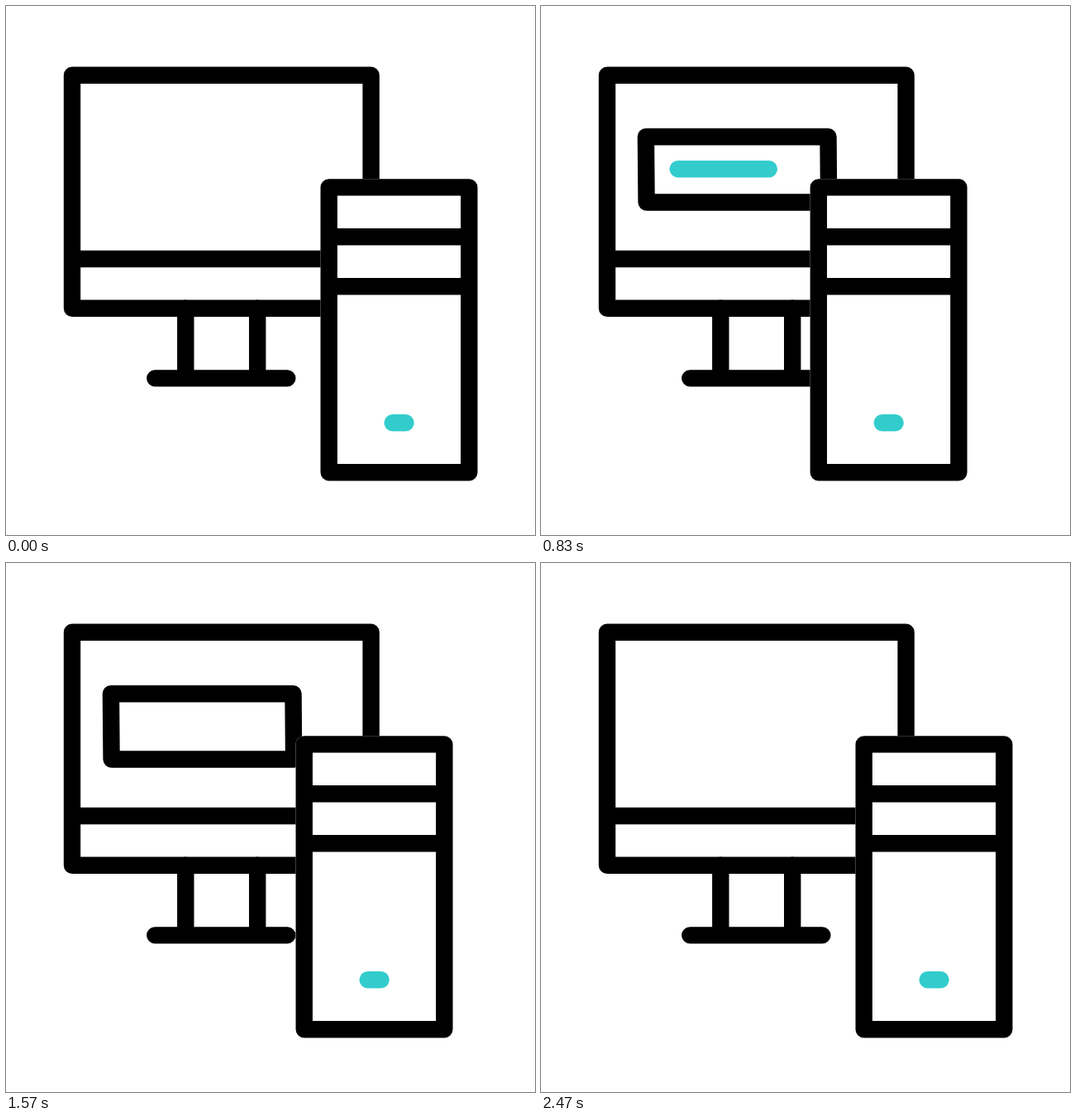
Recreate the animation shown at these times as an HTML page. Size 640 by 640 pixels, loop 2500 ms.

```html
<!DOCTYPE html>
<html lang="en">
<head>
<meta charset="utf-8">
<title>Desktop computer</title>
<style>
  html, body { margin: 0; width: 100%; height: 100%; overflow: hidden; background: #fff; }
  svg { display: block; width: 100vw; height: 100vh; }
  .ink { fill: none; stroke: #000; stroke-width: 20.4; stroke-linecap: round; stroke-linejoin: round; }
  .teal { stroke: #33cccc; }
</style>
</head>
<body>
<svg viewBox="0 0 640 640">
  <g class="ink">
    <path d="M80 83.8H441.6V365.8H80ZM80 306H441.6"/>
    <path d="M217.3 365.8V450.4M304.2 365.8V450.4M180.3 450.4H340.3"/>
    <path id="panel"/>
    <path id="bar" class="teal"/>
  </g>
  <g id="tower">
    <rect x="380.5" y="209.2" width="190" height="365.2" rx="10.2" fill="#fff"/>
    <g class="ink">
      <path d="M390.7 219.4H560.3V564.2H390.7ZM390.7 279.2H560.3M390.7 339.2H560.3"/>
      <path id="led" d="M467.7 504.2H483.5"/>
    </g>
  </g>
</svg>
<script>
  const LOOP = 2500, STEPS = 75, TEAL = '#33cccc';
  const $ = id => document.getElementById(id);
  const panel = $('panel'), bar = $('bar'), tower = $('tower'), led = $('led');

  const corners = [[348.1, 237.5], [127.6, 237.5], [126.9, 158.2], [347.5, 158.2], [348.1, 237.5]];
  const line = [[165.7, 197.2], [303.8, 197.2]];

  const clamp = v => Math.max(0, Math.min(1, v));
  const smooth = (t, a, b) => {
    const u = clamp((t - a) / (b - a));
    return u * u * (3 - 2 * u);
  };

  // Cubic easing with flat ends; x1 and x2 set the pull at each side.
  function ease(t, a, b, x1, x2) {
    const x = clamp((t - a) / (b - a));
    let lo = 0, hi = 1;
    for (let i = 0; i < 24; i++) {
      const m = (lo + hi) / 2, n = 1 - m;
      if (3 * n * n * m * x1 + 3 * n * m * m * x2 + m * m * m < x) lo = m; else hi = m;
    }
    if (x === 0 || x === 1) return x;
    return lo * lo * (3 - 2 * lo);
  }

  // Path data for the part of a polyline between fractions a and b.
  function trim(pts, a, b) {
    if (b <= a) return '';
    const lens = pts.slice(1).map((p, i) => Math.hypot(p[0] - pts[i][0], p[1] - pts[i][1]));
    const total = lens.reduce((s, n) => s + n, 0);
    const from = a * total, to = b * total;
    const out = [];
    let pos = 0;
    lens.forEach((len, i) => {
      const s = Math.max(from, pos), e = Math.min(to, pos + len);
      const at = d => pts[i].map((v, k) => (v + (pts[i + 1][k] - v) * (d - pos) / len).toFixed(3));
      if (e > s) {
        if (!out.length) out.push(at(s));
        out.push(at(e));
      }
      pos += len;
    });
    return out.length ? 'M' + out.map(p => p.join(' ')).join('L') : '';
  }

  function draw(t) {
    panel.setAttribute('d', trim(corners, ease(t, 1633, 2467, 0.353, 0.43), smooth(t, 16, 786)));
    bar.setAttribute('d', trim(line, smooth(t, 933, 1558), smooth(t, 270, 1058)));
    const shift = 70 * (smooth(t, 1160, 1908) - smooth(t, 356, 1033));
    tower.setAttribute('transform', `translate(${shift.toFixed(3)} 0)`);
    const lit = t > 2000 || Math.floor(t / 333) % 2 === 0;
    led.style.stroke = lit ? TEAL : '#000';
  }

  // Thirty pictures per second, on a 10 ms clock.
  function tick(now) {
    const step = Math.floor((now % LOOP + 4) * STEPS / LOOP) % STEPS;
    draw(Math.round(step * LOOP / STEPS / 10) * 10);
    requestAnimationFrame(tick);
  }

  draw(0);
  requestAnimationFrame(tick);
</script>
</body>
</html>
```
